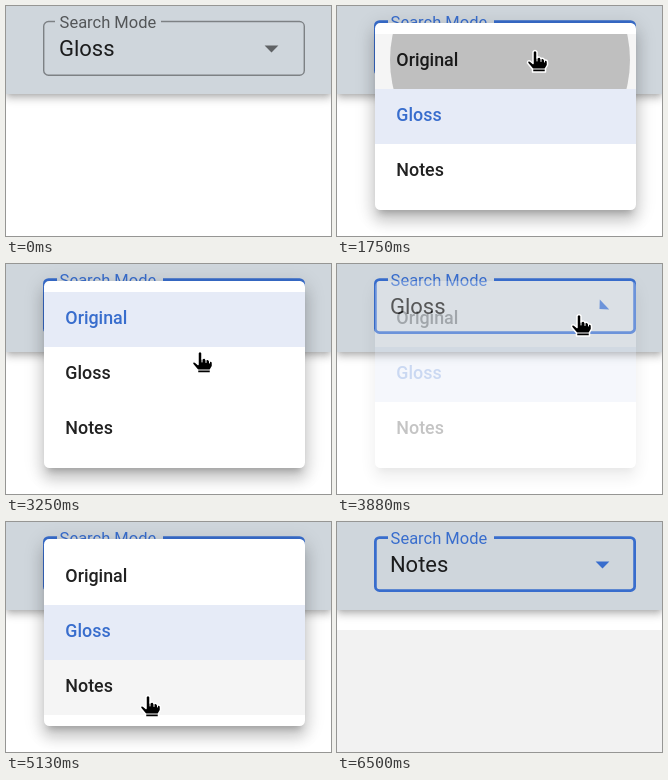
Animation of 325 by 230 pixels, one loop 6870 ms. Source, as an HTML page:

```html
<!DOCTYPE html>
<html lang="en">
<head>
<meta charset="utf-8">
<title>Search mode select</title>
<style>
  :root { --blue: #386dcd; }
  html, body { margin: 0; width: 100%; height: 100%; overflow: hidden; background: #fff; }
  #stage { position: relative; width: 325px; height: 230px; overflow: hidden; font-family: Roboto, sans-serif; }
  #stage > * { position: absolute; }
  #results { left: 0; top: 108px; width: 325px; height: 122px; background: #f2f2f2; }
  #header {
    left: 0; top: 0; width: 325px; height: 88px; background: #cfd6dc;
    box-shadow: 0 2.75px 5.5px -1.4px rgba(0,0,0,.2), 0 5.5px 6.9px rgba(0,0,0,.14), 0 1.4px 13.75px rgba(0,0,0,.12);
  }
  svg { left: 0; top: 0; width: 325px; height: 230px; }
  #menu {
    left: 38px; top: 17px; width: 261px; height: 165px; padding: 11px 0; border-radius: 5.5px; background: #fff;
    box-shadow: 0 6.9px 6.9px -4.1px rgba(0,0,0,.2), 0 11px 13.75px 1.4px rgba(0,0,0,.14), 0 4.1px 19px 2.75px rgba(0,0,0,.12);
  }
  .item {
    position: relative; height: 55px; line-height: 52.4px; padding-left: 21.3px; overflow: hidden;
    font-size: 17.875px; font-weight: 500; color: rgba(0,0,0,.87);
  }
  .item.hover { background: #f5f5f5; }
  .item.selected { color: var(--blue); background: #e6ebf7; }
  .ripple { position: absolute; border-radius: 50%; background: currentColor; }
</style>
</head>
<body>
<div id="stage">
  <div id="results"></div>
  <div id="header"></div>
  <svg viewBox="0 0 325 230">
    <path id="border" fill="none"/>
    <text id="label" x="53.6" y="22" font-size="16.5">Search Mode</text>
    <text id="value" x="52.9" y="50" font-size="22" fill="rgba(0,0,0,.87)"></text>
    <path id="arrow" d="M-6.9-2.75H6.9L0 4.1Z"/>
  </svg>
  <div id="menu"></div>
  <svg viewBox="0 0 325 230">
    <g id="cursor" stroke-linejoin="round" stroke-linecap="round">
      <path d="M-2 2Q0-1 2 2V8Q4.500 6 6 8.500Q8.500 7.500 9.500 10Q12.500 9.500 12.500 12.500V15L10.500 18.500V22H-2.500V19L-7.500 13Q-7.500 10-5 11L-2 13.500Z" fill="#000" stroke="#fff" stroke-width="1.500"/>
      <path d="M2 8V11M6 8.500V11.500M9.500 10V12M-2 19H10" fill="none" stroke="#fff" stroke-width="1"/>
    </g>
  </svg>
</div>
<script>
const LOOP = 6870, STEP = 125, FADE = 300;
const OPTIONS = ['Original', 'Gloss', 'Notes'];
const ROW = 55, ROW_W = 261, LIST_X = 38, LIST_Y = 28;

// One visit to the menu each: opens, press, closes, picked option
const VISITS = [
  { open: 820, press: 1606, close: 1800, pick: 0 },
  { open: 2690, press: 3480, close: 3770, pick: 1 },
  { open: 4200, press: 5240, close: 5390, pick: 2 }
];

// Pointer fingertip: time, x, y
const PATH = [
  [375, 303, 88], [500, 276, 56], [625, 255, 38], [1125, 255, 38], [1500, 200, 46],
  [1750, 198, 44], [2000, 198, 44], [2250, 207, 42], [2375, 207, 42], [2500, 209, 42],
  [2875, 209, 42], [3250, 194, 87], [3375, 194, 105], [3750, 194, 105], [3875, 242, 50],
  [4000, 252, 40], [4375, 252, 40], [5000, 141, 165], [5125, 142, 173], [5250, 142, 178],
  [6000, 142, 178], [6500, 250, -24]
];

const $ = id => document.getElementById(id);
const clamp = x => Math.min(1, Math.max(0, x));
const mix = (a, b, p) => a + (b - a) * p;

// cubic-bezier(.25, .8, .5, 1)
function swing(x) {
  if (x <= 0 || x >= 1) return clamp(x);
  const curve = (a, b, u) => 3 * (1 - u) ** 2 * u * a + 3 * (1 - u) * u * u * b + u ** 3;
  let lo = 0, hi = 1;
  for (let i = 0; i < 20; i++) {
    const mid = (lo + hi) / 2;
    if (curve(.25, .5, mid) < x) lo = mid; else hi = mid;
  }
  return curve(.8, 1, lo);
}

function pointer(t) {
  if (t < PATH[0][0] || t >= 6500) return null;
  const i = PATH.findIndex(k => k[0] > t);
  const a = PATH[i - 1], b = PATH[i], p = (t - a[0]) / (b[0] - a[0]);
  return { x: mix(a[1], b[1], p), y: mix(a[2], b[2], p) };
}

const rows = OPTIONS.map(name => {
  const row = document.createElement('div'), ripple = document.createElement('div');
  row.textContent = name;
  ripple.className = 'ripple';
  row.append(ripple);
  $('menu').append(row);
  return { row, ripple };
});

function drawBorder(focused, hovered, focus) {
  const inset = focused ? 1.375 : .7, r = 5.5 - inset;
  const l = 37 + inset, right = 299 - inset, top = (focused ? 14.2 : 14.8) + inset, bottom = 69.9 - inset;
  const [from, to] = focused ? [51, 157] : [49, 155];
  const arc = (x, y) => `a${r} ${r} 0 0 1 ${x} ${y}`;
  const el = $('border');
  el.setAttribute('d', `M${to} ${top}H${right - r}${arc(r, r)}V${bottom - r}${arc(-r, r)}H${l + r}${arc(-r, -r)}V${top + r}${arc(r, -r)}H${from}`);
  el.setAttribute('stroke-width', inset * 2);
  el.setAttribute('stroke', focused ? tint(focus, 40) : `rgba(0,0,0,${hovered ? .86 : .4})`);
}

// Dark grey turning to blue
const tint = (p, dark) => `rgb(${[56, 109, 205].map(c => Math.round(mix(dark, c, p)))})`;

function drawRipple(el, row, visit, t) {
  const age = t - visit.press;
  const shown = age > 0 && row === visit.pick;
  el.style.display = shown ? '' : 'none';
  if (!shown) return;
  const p = 1 - (1 - clamp(age / FADE)) ** 3;
  const start = pointer(visit.press);
  const r = Math.hypot(ROW_W, ROW) / 2 * mix(.3, 1, p);
  const x = mix(start.x - LIST_X, ROW_W / 2, p), y = mix(start.y - LIST_Y - row * ROW, ROW / 2, p);
  el.style.left = x - r + 'px';
  el.style.top = y - r + 'px';
  el.style.width = el.style.height = 2 * r + 'px';
  el.style.opacity = .25 * (1 - clamp((t - visit.close) / 150));
}

function render(t) {
  const visit = VISITS.filter(v => t >= v.open).pop();
  const done = VISITS.filter(v => t >= v.close).pop();
  const chosen = done ? done.pick : 1;
  const shown = !visit ? 0
    : t < visit.close ? swing((t - visit.open) / FADE)
    : 1 - swing((t - visit.close) / FADE);
  const focus = swing((t - VISITS[0].open) / FADE);
  const tip = pointer(t), before = pointer(t - STEP);

  drawBorder(!!visit, t >= 500, focus);
  $('label').setAttribute('fill', visit ? tint(focus, 90) : 'rgba(0,0,0,.6)');
  $('value').textContent = OPTIONS[chosen];
  $('arrow').setAttribute('fill', visit ? tint(focus, 90) : 'rgba(0,0,0,.54)');
  $('arrow').setAttribute('transform', `translate(265.5 42.3) rotate(${180 * shown})`);
  $('results').style.display = t >= 5500 ? '' : 'none';

  $('menu').style.opacity = shown;
  const over = before ? Math.floor((before.y - LIST_Y) / ROW) : -1;
  rows.forEach(({ row, ripple }, i) => {
    row.className = 'item' + (i === chosen ? ' selected' : i === over ? ' hover' : '');
    if (visit) drawRipple(ripple, i, visit, t);
    else ripple.style.display = 'none';
  });

  $('cursor').style.display = tip ? '' : 'none';
  if (tip) $('cursor').setAttribute('transform', `translate(${Math.round(tip.x)} ${Math.round(tip.y)})`);
}

const begin = performance.now();
function tick() {
  const t = (performance.now() - begin) % LOOP;
  render(Math.floor(t / STEP) * STEP);
  requestAnimationFrame(tick);
}
tick();
</script>
</body>
</html>
```
